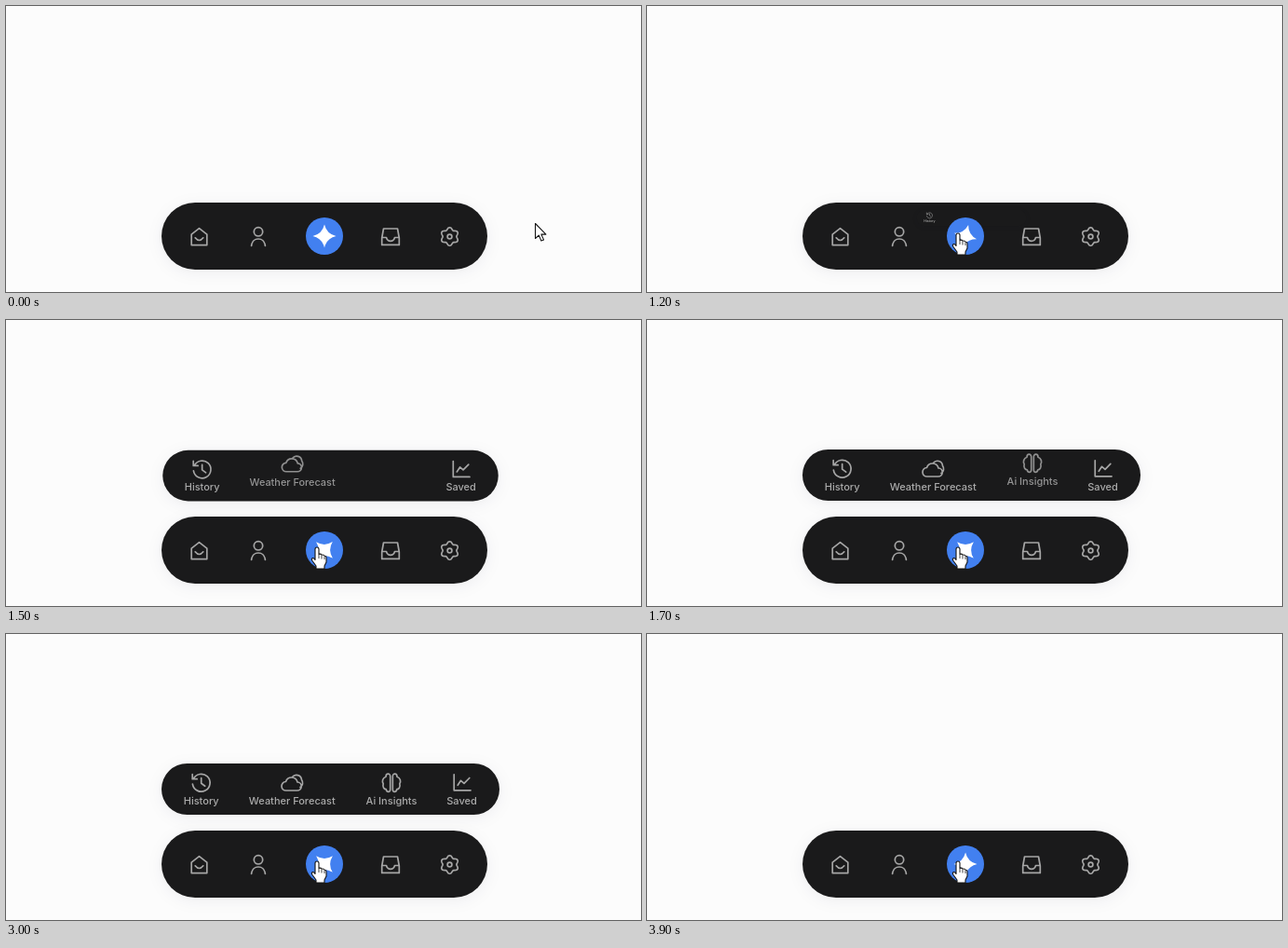
These frames come from a looping animation (682 px wide and 307 px high, 4 s). An HTML page:

```html
<!DOCTYPE html>
<html lang="en">
<head>
<meta charset="utf-8">
<title>Floating menu</title>
<style>
  html, body { margin: 0; width: 100%; height: 100%; overflow: hidden; background: #fcfcfc; }
  svg { display: block; width: 682px; height: 307px; }
  .surface { fill: #1a1a1b; filter: drop-shadow(0 3px 8px rgba(20, 20, 50, .06)); }
  .icon { fill: none; stroke: #a6a6a6; stroke-width: 1.7; stroke-linecap: round; stroke-linejoin: round; }
  text { font: 500 11px Inter, sans-serif; fill: #ababab; text-anchor: middle; }
  .cursor { fill: #fff; stroke: #151515; stroke-width: 1.1; stroke-linejoin: round; }
</style>
</head>
<body>
<svg viewBox="0 0 682 307">
  <rect class="surface" x="167" y="211" width="350" height="72" rx="36"/>
  <g class="icon">
    <path d="M207.5 238.7L215.8 245.2V256.6H199.2V245.2ZM203.2 248.8Q207.5 254.2 211.8 248.8"/>
    <path d="M263.6 257.5C264.5 247.5 277.500 247.500 278.400 257.500"/>
    <circle cx="271" cy="242.300" r="4.700"/>
    <path d="M405.500 239H420.500L422.300 249V256.400H403.700V249ZM403.700 248.500H408.500Q409.500 252.300 413 252.300T417.500 248.500H422.300"/>
    <path id="gear" transform="translate(476.500 247.500)"/>
    <circle cx="476.500" cy="247.500" r="2.400"/>
  </g>

  <g id="panel">
    <rect class="surface" x="167" y="139" width="363" height="55" rx="27.500"/>
    <g class="item">
      <path class="icon" transform="translate(209.700 159.700)" d="M-8.500-4A9.400 9.400 0 1 1-9.300 1.500M-9.500-9V-4H-4.500M0-5V.5L4 3.500"/>
      <text x="209.700" y="183">History</text>
    </g>
    <g class="item">
      <path class="icon" transform="translate(307.500 159.500)" d="M-6.500 8.500H5A4.500 4.500 0 0 0 5.500-.5A6.500 6.500 0 0 0-7-1A4.600 4.600 0 0 0-6.500 8.500ZM0-6A5.600 5.600 0 0 1 10-3A5.500 5.500 0 0 1 8.500 5"/>
      <text x="307.300" y="183">Weather Forecast</text>
    </g>
    <g class="item">
      <g class="icon" transform="translate(414 159.700)">
        <path id="lobe" d="M-1.300-7C-1.300-10.500-6-10.500-6-6.500C-9.500-5.500-10.500-1-8.800 1C-10 5-7.500 7-5.800 7C-5 10.500-1.300 10.500-1.300 7Z"/>
        <use href="#lobe" transform="scale(-1 1)"/>
      </g>
      <text x="414" y="183">Ai Insights</text>
    </g>
    <g class="item">
      <path class="icon" transform="translate(490 159.300)" d="M-8.800-8.500V8.500H9M-4.800 3L-1.500-2L2 1L7.800-4.800"/>
      <text x="489.500" y="183">Saved</text>
    </g>
  </g>

  <circle cx="342" cy="247" r="20" fill="#4280f0"/>
  <path id="star" fill="#fff" d="M0-12.500Q2.400-2.400 12.500 0Q2.400 2.400 0 12.500Q-2.400 2.400-12.500 0Q-2.400-2.400 0-12.500Z"/>

  <path id="arrow" class="cursor" d="M0 0V16L3.800 12.600L6.400 18.600L9 17.400L6.400 11.600H11.400Z"/>
  <g id="hand" class="cursor">
    <path d="M-2 2Q-2 0 0 0T2 2V7.500Q4 6.500 5 8.200Q7 7.400 8 9.200Q10 9 10 11.200V16L8 20V23H-1V20L-5 14.500Q-6.500 12-4.500 11.500Q-3 11.500-2 13.500Z"/>
    <path d="M2 8V12M5 9V12.500M8 10V13" stroke-width=".8"/>
  </g>
</svg>
<script>
  const LOOP = 4000, STEP = 100;
  const $ = id => document.getElementById(id);
  const items = [...document.querySelectorAll('.item')];
  const starts = [1000, 1400, 1600, 1200];
  const clamp = v => Math.min(1, Math.max(0, v));
  const easeOut = (v, power) => 1 - (1 - clamp(v)) ** power;
  const move = (el, x, y, rest = '') => el.setAttribute('transform', `translate(${x} ${y}) ${rest}`);

  // Underdamped spring from 0 to 1
  function spring(ms) {
    if (ms <= 0) return 0;
    const s = ms / 1000, damp = 15.3, freq = 20;
    return 1 - Math.exp(-damp * s) * (Math.cos(freq * s) + damp / freq * Math.sin(freq * s));
  }

  function gearPath() {
    const points = [];
    for (let deg = 0; deg < 360; deg += 6) {
      const a = deg * Math.PI / 180;
      const r = 8.6 - 1.2 * Math.cos(6 * a);
      points.push(`${(r * Math.cos(a)).toFixed(2)} ${(r * Math.sin(a)).toFixed(2)}`);
    }
    return `M${points.join('L')}Z`;
  }

  function draw(t) {
    const open = t < 3500 ? spring(t - 1160) : 1 - spring(t - 3560);
    const scale = Math.max(0, open);
    const visible = scale > 0.01 && t < 3800;
    $('panel').style.display = visible ? '' : 'none';
    move($('panel'), 348.5, 166.5 + 90 * (1 - scale), `scale(${scale}) translate(-348.5 -166.5)`);
    items.forEach((item, i) => {
      const p = easeOut((t - starts[i]) / 300, 3);
      move(item, 0, -20 * (1 - p));
      item.style.opacity = clamp(p * 1.2);
    });
    move($('star'), 342, 247, `rotate(${45 * open})`);

    const travel = easeOut(t / 700, 3.2);
    const x = 568.5 - 234.5 * travel, y = 233.5 + 10.5 * travel;
    const over = x < 362;
    $('arrow').style.display = over ? 'none' : '';
    $('hand').style.display = over ? '' : 'none';
    move($('arrow'), x, y);
    move($('hand'), x, y);
  }

  $('gear').setAttribute('d', gearPath());
  const begin = performance.now();
  function tick() {
    const t = (performance.now() - begin) % LOOP;
    draw(Math.floor(t / STEP) * STEP);
    requestAnimationFrame(tick);
  }
  tick();
</script>
</body>
</html>
```
